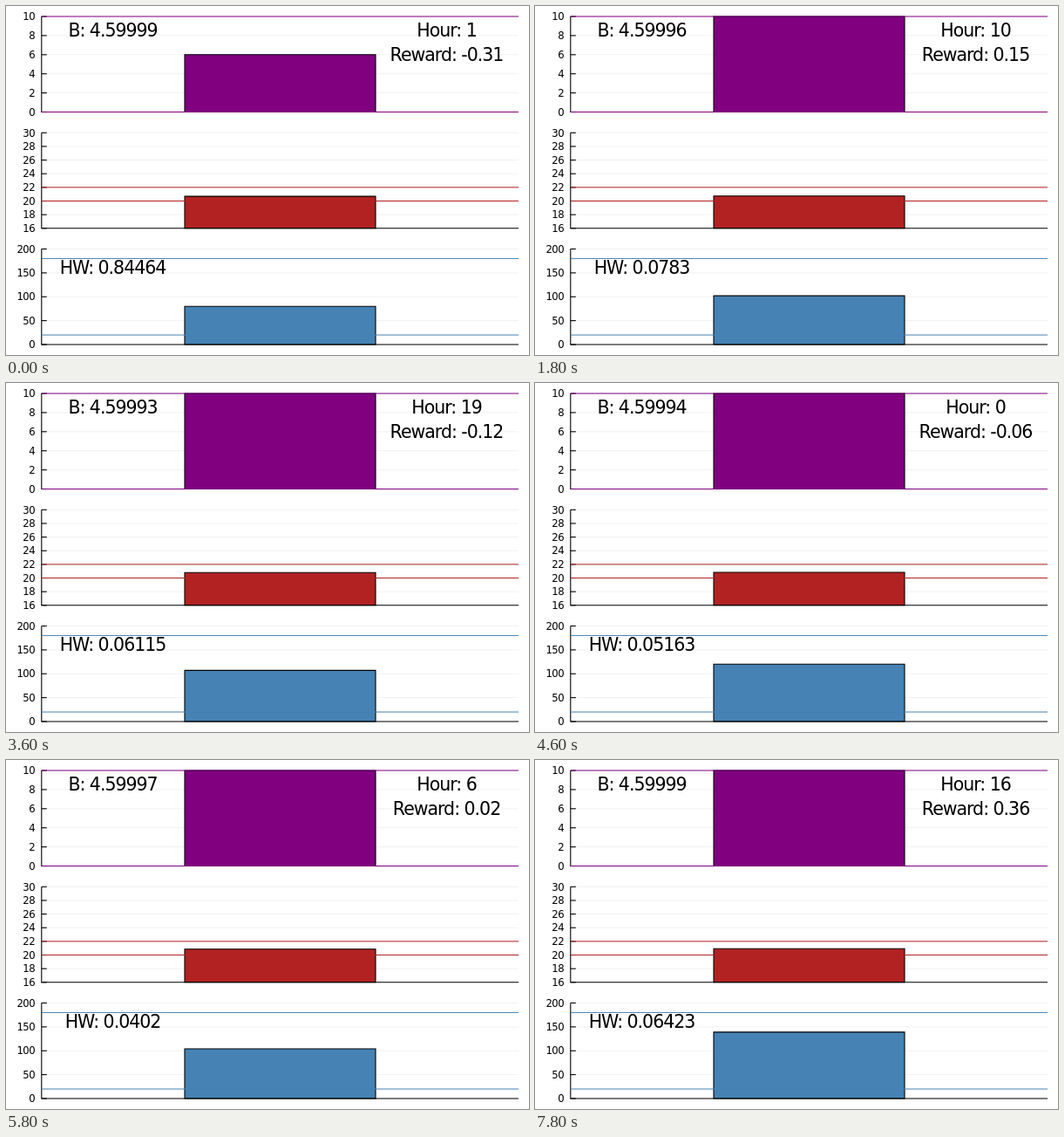
An HTML page for the animation above (8000 ms loop, 600x400 px).

```html
<!DOCTYPE html>
<html lang="en">
<head>
<meta charset="utf-8">
<title>Hourly state bars</title>
<style>
  html, body { margin: 0; width: 100%; height: 100%; overflow: hidden; background: #fff; }
  svg { display: block; width: 600px; height: 400px; }
  text { font-family: "DejaVu Sans", sans-serif; letter-spacing: -0.049em; }
  .tick { font-size: 11.7px; text-anchor: end; }
  .note { font-size: 20.5px; text-anchor: middle; }
  .grid { stroke: #f1f1f1; }
  .axis, .bar { stroke: #000; stroke-width: 1.1; }
  .axis { fill: none; }
</style>
</head>
<body>
<svg id="stage" viewBox="0 0 600 400"></svg>
<script>
const LEFT = 40.8, RIGHT = 588, BAR_LEFT = 205, BAR_RIGHT = 424, HEIGHT = 109.5;
const STEP_MS = 200, STEPS = 40;
const stage = document.getElementById('stage');

function add(tag, attrs, content = '') {
  const node = document.createElementNS('http://www.w3.org/2000/svg', tag);
  for (const key in attrs) node.setAttribute(key, attrs[key]);
  node.textContent = content;
  return stage.appendChild(node);
}

// Draws one chart and returns a function that sets its bar.
function makePlot({ base, min, max, tick, color, limits }) {
  const y = value => base - (value - min) / (max - min) * HEIGHT;
  const line = (value, x2, attrs) => add('path', { d: `M${LEFT},${y(value)}H${x2}`, ...attrs });
  for (let v = min; v <= max; v += tick) line(v, RIGHT, { class: 'grid' });
  const bar = add('path', { class: 'bar', fill: color });
  for (let v = min; v <= max; v += tick) {
    line(v, LEFT + 6, { class: 'axis' });
    add('text', { class: 'tick', x: 33, y: y(v) + 4.2 }, v);
  }
  add('path', { class: 'axis', d: `M${LEFT},${y(max)}V${base}H${RIGHT}` });
  for (const value of limits) line(value, RIGHT, { stroke: color });
  return value => bar.setAttribute('d', `M${BAR_LEFT},${base}V${y(value)}H${BAR_RIGHT}V${base}Z`);
}

function makeNote(x, y) {
  const node = add('text', { class: 'note', x, y });
  return text => { node.textContent = text; };
}

// Straight runs between [step, value] key points.
function track(...points) {
  return step => {
    const next = Math.max(1, points.findIndex(p => p[0] >= step));
    const [s0, v0] = points[next - 1], [s1, v1] = points[next];
    return v0 + (v1 - v0) * (step - s0) / (s1 - s0);
  };
}

const drawBattery = makePlot({ base: 121.5, min: 0, max: 10, tick: 2, color: '#800080', limits: [0, 10] });
const drawRoom = makePlot({ base: 254.8, min: 16, max: 30, tick: 2, color: '#b22222', limits: [20, 22] });
const drawTank = makePlot({ base: 388, min: 0, max: 200, tick: 50, color: '#4682b4', limits: [20, 180] });

const showB = makeNote(122.5, 35.4), showHour = makeNote(505.5, 35.4);
const showReward = makeNote(505.5, 62.9), showHW = makeNote(122.5, 307.4);

const battery = step => Math.min(10, 6 + step / 2);
const room = step => 20.69 + 0.006 * step;
const tank = track([0, 80], [9, 102], [18, 107], [23, 120], [24, 75], [29, 104], [39, 139]);
const reward = track([0, -0.31], [9, 0.15], [18, -0.12], [29, 0.02], [35, 0.64], [39, 0.36]);
const levelB = step => 4.59996 + 0.00003 * Math.cos(step * Math.PI / 18);
const levelHW = track([0, 0.84464], [9, 0.0783], [29, 0.0402], [35, 0.11031], [39, 0.06423]);

const rounded = (value, digits) => Number(value.toFixed(digits)) || 0;

function render(step) {
  drawBattery(battery(step));
  drawRoom(room(step));
  drawTank(tank(step));
  showB(`B: ${rounded(levelB(step), 5)}`);
  showHW(`HW: ${rounded(levelHW(step), 5)}`);
  showHour(`Hour: ${(step + 1) % 24}`);
  showReward(`Reward: ${rounded(reward(step), 2)}`);
}

function frame() {
  render(Math.floor(performance.now() / STEP_MS) % STEPS);
  requestAnimationFrame(frame);
}
frame();
</script>
</body>
</html>
```
